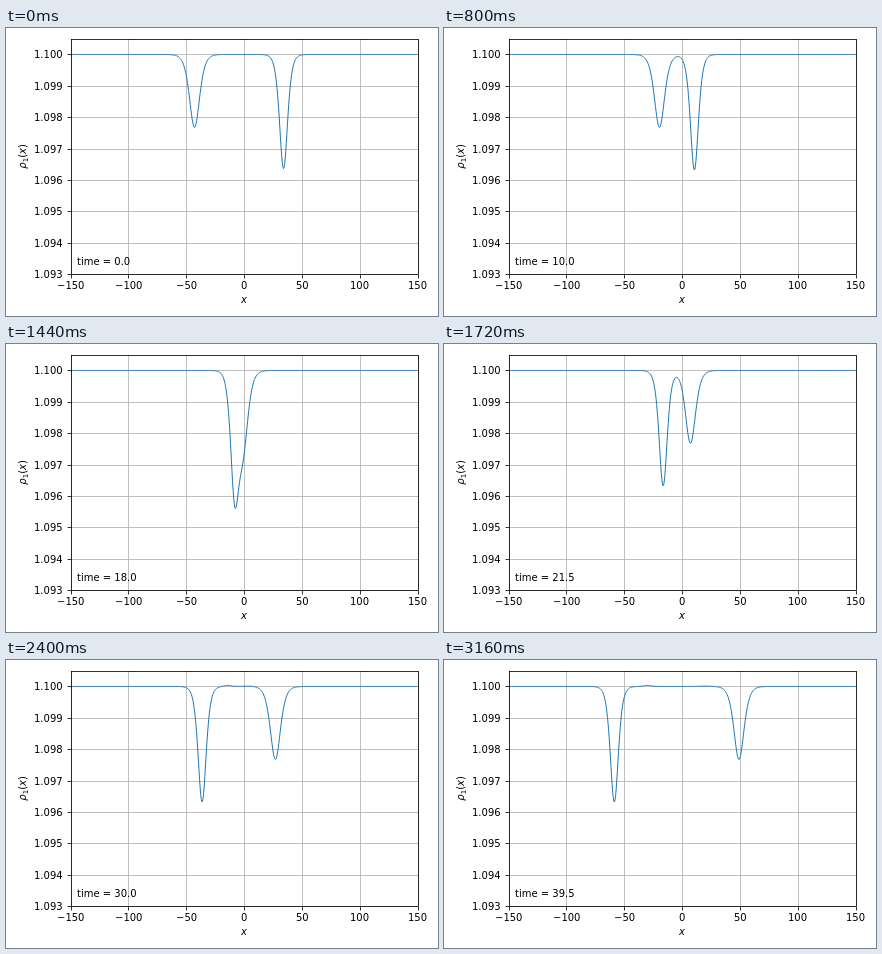
Animation, 432 px wide and 288 px high, one loop 3200 ms. Source, as an HTML page:

```html
<!DOCTYPE html>
<html lang="en">
<head>
<meta charset="utf-8">
<title>Colliding dips</title>
<style>
  html, body { margin: 0; width: 100%; height: 100%; overflow: hidden; background: #fff; }
  svg { display: block; }
  text { font: 10px "DejaVu Sans", sans-serif; }
  .math { font-style: italic; }
  .sub { font-size: 7px; }
  path, rect { fill: none; stroke-width: .8; }
</style>
</head>
<body>
<svg width="432" height="288" viewBox="0 0 432 288">
  <path id="grid" stroke="#b0b0b0"/>
  <path id="curve" stroke="#1f77b4" style="stroke-width:1" stroke-linejoin="round"/>
  <path id="ticks" stroke="#000"/>
  <rect x="65.5" y="11.5" width="347" height="235" stroke="#000"/>
  <g id="labels"></g>
  <text class="math" x="235" y="275">x</text>
  <text transform="translate(20 140.7) rotate(-90)"><tspan class="math">ρ</tspan><tspan class="sub" dy="1.6">1</tspan><tspan dy="-1.6">(</tspan><tspan class="math">x</tspan>)</text>
  <text id="clock" x="71" y="237"></text>
</svg>
<script>
const $ = id => document.getElementById(id);
const SCALE = 347 / 300, MID = 238.1, TOP = 26.45, ROW = 31.36;
const DIGIT = 6.36, MINUS = 8.38;
const snap = v => Math.round(v) + .5;

let grid = '', ticks = '', labels = '';
for (let v = -150; v <= 150; v += 50) {
  const x = MID + v * SCALE, line = snap(x);
  const width = String(Math.abs(v)).length * DIGIT + (v < 0 ? MINUS : 0);
  grid += `M${line} 11V246`;
  ticks += `M${line} 247v3.5`;
  labels += `<text x="${Math.round(x - width / 2)}" y="261">${String(v).replace('-', '\u2212')}</text>`;
}
for (let i = 0; i < 8; i++) {
  const line = snap(TOP + i * ROW);
  grid += `M65 ${line}H412`;
  ticks += `M65 ${line}h-3.5`;
  labels += `<text x="28" y="${line + 3.5}">${(1.1 - i / 1000).toFixed(3)}</text>`;
}
$('grid').setAttribute('d', grid);
$('ticks').setAttribute('d', ticks);
$('labels').innerHTML = labels;

const sech2 = u => 1 / Math.cosh(u) ** 2;

// Depth below the rest level, in pixels
function depth(x, t) {
  const small = 73 * sech2((x + 42.85 - 2.33 * t) / 5.8);
  const big = (115.6 - 1.4 * Math.exp(-t / 2)) * sech2((x - 34.1 + 2.347 * t) / 4.62);
  // Faint ripples left behind by the collision
  const fade = Math.min(1, Math.max(0, (t - 16) / 6));
  const left = 1.1 * sech2((x + 14.3 + 1.65 * (t - 30)) / 3.8);
  const right = .4 * sech2((x - 5 - 1.6 * (t - 30)) / 6);
  return small + big - fade * (left + right);
}

function draw(now) {
  const t = Math.floor(now % 3200 / 40) / 2;
  let d = '';
  for (let x = -150; x <= 150; x += .5)
    d += `${d ? 'L' : 'M'}${(MID + x * SCALE).toFixed(2)} ${(TOP + depth(x, t)).toFixed(2)}`;
  $('curve').setAttribute('d', d);
  $('clock').textContent = `time = ${t.toFixed(1)}`;
}

let start;
function tick(now) {
  start ??= now;
  draw(now - start);
  requestAnimationFrame(tick);
}
draw(0);
requestAnimationFrame(tick);
</script>
</body>
</html>
```
